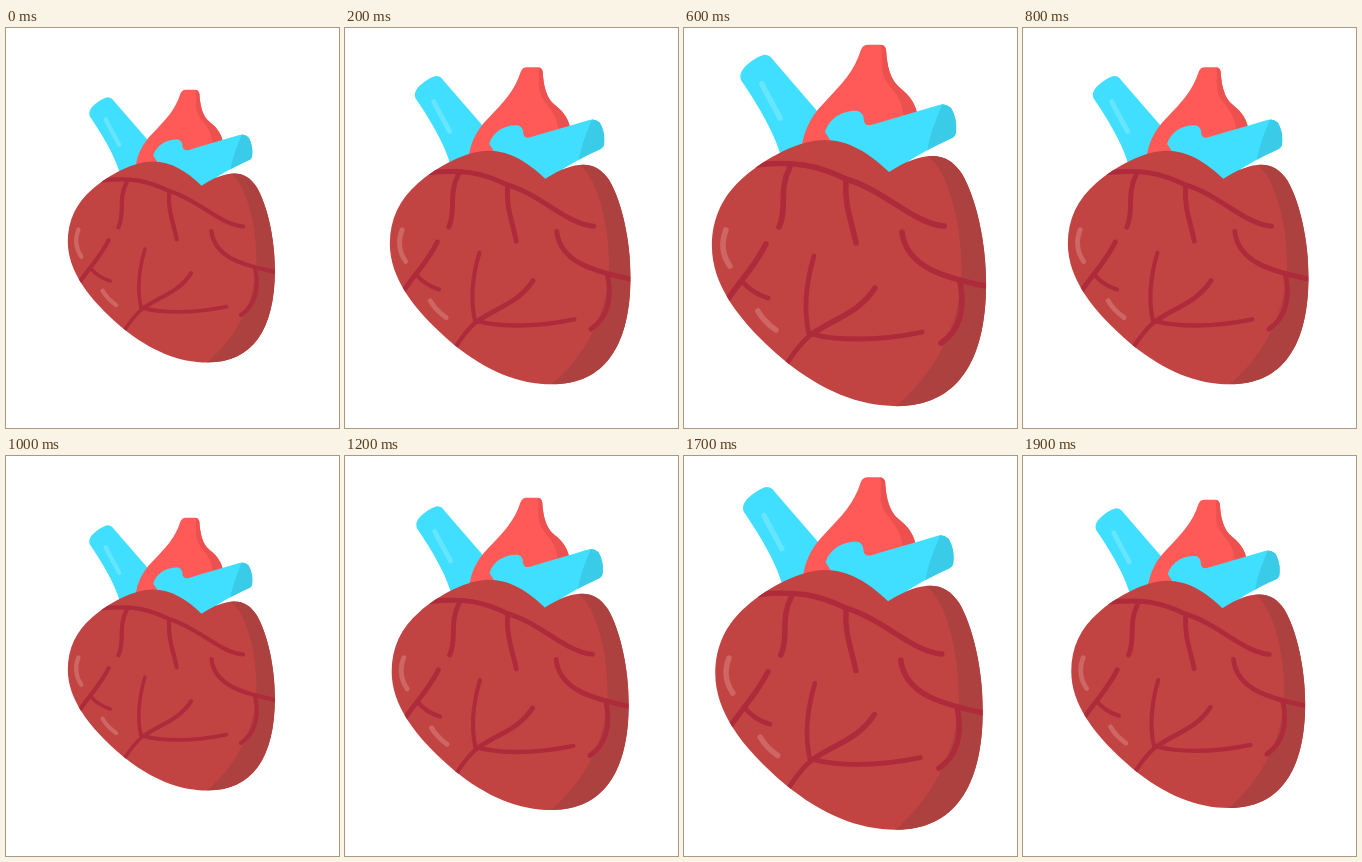
An HTML page that plays this animation: 333 by 400 pixels, repeating every 2 s.

```html
<!DOCTYPE html>
<html lang="en">
<head>
<meta charset="utf-8">
<title>Beating heart</title>
<style>
  html, body { margin: 0; width: 100%; height: 100%; overflow: hidden; background: #fff; }
  svg { display: block; width: 100%; height: 100%; }
  .line { fill: none; stroke-width: 5.6; stroke-linecap: round; stroke-linejoin: round; }
</style>
</head>
<body>
<svg viewBox="0 0 333 400">
  <defs>
    <path id="muscle" d="M205 144C185 125 165 112 140 112C116 112 83 129 60 149C39 167 28 190 28 218C28 256 54 293 100 332C138 363 175 378 213 378C272 378 302 335 302 255C302 214 292 170 278 146C270 134 261 128 248 128C236 128 222 133 205 144Z"/>
    <path id="aorta" d="M177 22Q179 17 184 17H196Q201 17 202 22C203 38 206 52 216 60C226 68 232 76 234 90L180 130H117C117 108 125 90 140 75C158 56 170 44 177 22Z"/>
    <path id="artery" d="M141 104C146 88 162 82 174 83Q180 85 180 93Q181 98 187 97C210 90 232 84 255 77Q261 75 267 80Q273 90 272 103Q272 108 268 110C246 120 232 128 222 135L205 145L150 118Z"/>
    <clipPath id="inMuscle"><use href="#muscle"/></clipPath>
    <clipPath id="inAorta"><use href="#aorta"/></clipPath>
    <clipPath id="inArtery"><use href="#artery"/></clipPath>
  </defs>
  <g id="heart">
    <path fill="#40dfff" d="M96 125C89 101 70 71 57 52Q55 46 60 40C66 34 73 29 80 27Q86 27 89 32L134 84L140 125Z"/>
    <path class="line" stroke="#66e5ff" d="M78 56C83 67 90 78 96 90"/>

    <use href="#aorta" fill="#ff5a57"/>
    <path clip-path="url(#inAorta)" fill="#ec5150" d="M196 15C200 22 195 38 200 49C205 61 218 66 220 90H240V15Z"/>

    <use href="#artery" fill="#40dfff"/>
    <path clip-path="url(#inArtery)" fill="#3acbe8" d="M259 74C253 90 246 104 243 124H280V74Z"/>

    <use href="#muscle" fill="#c14442"/>
    <g clip-path="url(#inMuscle)">
      <path fill="#ad413f" d="M238 126C258 130 277 182 277.500 240C277 290 257 340 211 379H310V126Z"/>
      <g class="line" stroke="#ae2b3b">
        <path d="M72 137C112 133 133 137 162 151C200 162 230 196 260 198"/>
        <path d="M106 139C94 162 104 180 95 199"/>
        <path d="M162 152C160 177 168 194 172 215"/>
        <path d="M218 204C222 240 262 250 306 259"/>
        <path d="M276 254C281 280 276 302 257 315"/>
        <path stroke-width="4.8" d="M130 228C122 255 119 280 125 306"/>
        <path d="M191 260C174 286 150 290 128 306"/>
        <path stroke-width="4.8" d="M128 306C118 313 110 324 100 340"/>
        <path stroke-width="5" d="M128 306C150 312 190 314 238 304"/>
        <path d="M82 216C70 240 58 250 42 274"/>
        <path stroke-width="4.8" d="M58 253C66 263 74 267 84 270"/>
      </g>
    </g>
    <path class="line" stroke="#ce6664" d="M42 202C37 215 39 228 46 238M74 283C78 290 85 297 92 302"/>
  </g>
</svg>
<script>
  const LOOP = 2000, STEP = 100;
  const DRAWN_SCALE = 1.323; // size at which the paths above are drawn
  const beats = [[0, 1], [500, 1.405], [1000, 1], [1560, 1.405], [2060, 1]]; // time, scale
  const heart = document.getElementById("heart");

  function scaleAt(time) {
    const i = beats.findIndex(([end]) => time < end);
    const [t0, s0] = beats[i - 1], [t1, s1] = beats[i];
    return s0 + (s1 - s0) * (time - t0) / (t1 - t0);
  }

  function draw() {
    const time = Math.floor(performance.now() % LOOP / STEP) * STEP;
    const scale = scaleAt(time) / DRAWN_SCALE;
    heart.setAttribute("transform", `translate(166.5 200) scale(${scale}) translate(-166.5 -200)`);
    requestAnimationFrame(draw);
  }
  draw();
</script>
</body>
</html>
```
